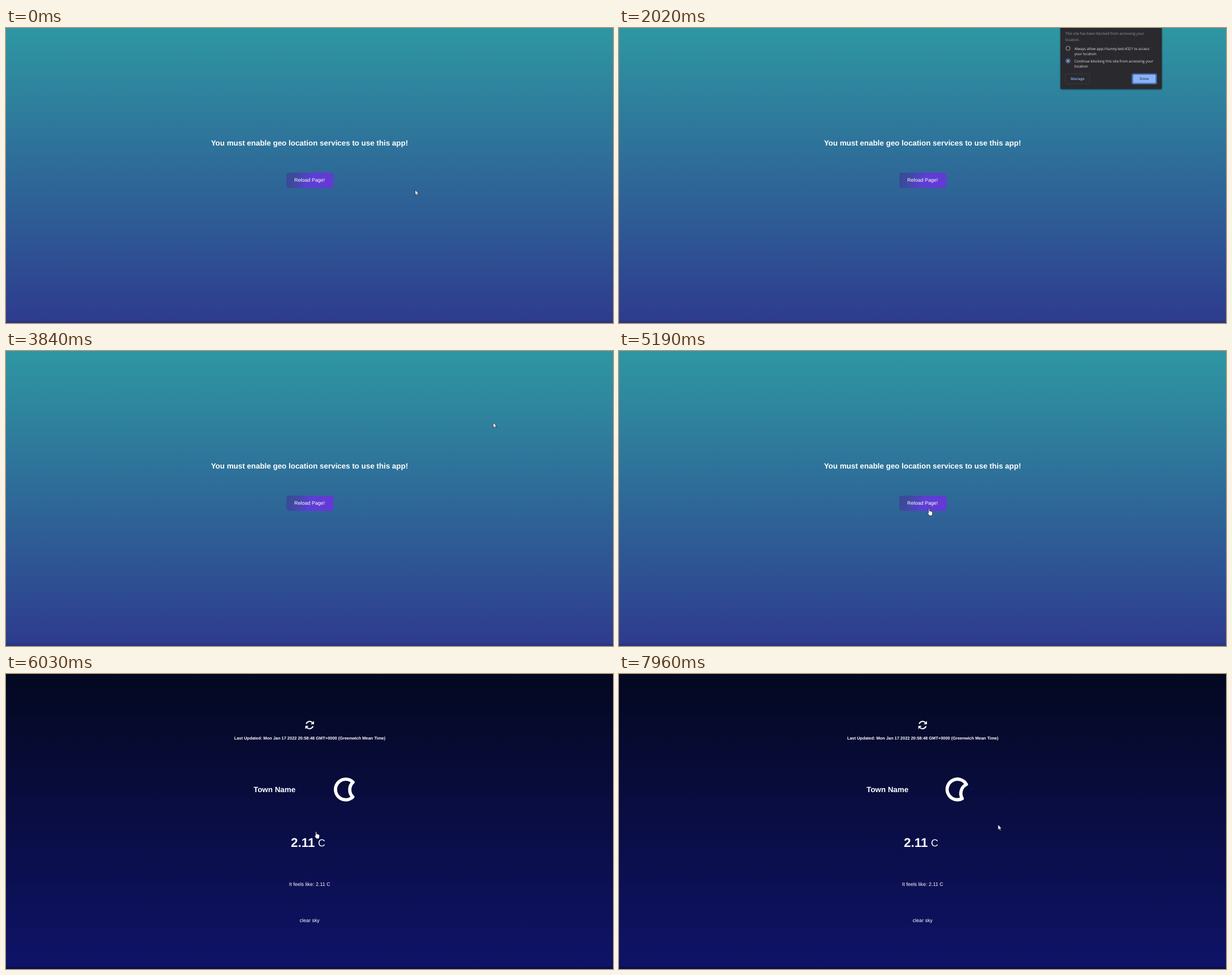
An HTML page that plays this animation: 1074x522 px, repeating every 8 s.

```html
<!DOCTYPE html>
<html lang="en">
<head>
<meta charset="utf-8">
<title>Weather app</title>
<style>
  html, body { margin: 0; width: 100%; height: 100%; overflow: hidden; background: #2e6898; }
  svg { display: block; width: 100vw; height: 100vh; }
  text { font-family: "Liberation Sans", Arial, sans-serif; font-size: 8.95px; fill: #fff; text-rendering: geometricPrecision; }
  .bold { font-weight: bold; }
  .title { font-size: 13.4px; }
  .mid { text-anchor: middle; }
  #popup text { font-family: "Open Sans", "Noto Sans", sans-serif; font-size: 6.4px; fill: #e8eaed; }
  #popup .muted { fill: #969ba1; }
  #popup .label { font-weight: 600; }
  .ring { fill: none; stroke: #c4c7cc; stroke-width: .8; }
  .ring.on { stroke: #8ab4f8; }
  .dot { fill: #8ab4f8; }
</style>
</head>
<body>
<svg viewBox="0 0 1074 522" preserveAspectRatio="none">
  <defs>
    <linearGradient id="daySky" x2="0" y2="1">
      <stop stop-color="#2e97a2"/><stop offset="1" stop-color="#2e3b8e"/>
    </linearGradient>
    <linearGradient id="nightSky" x2="0" y2="1">
      <stop stop-color="#040820"/><stop offset="1" stop-color="#0f1368"/>
    </linearGradient>
    <linearGradient id="buttonFill" y2=".12">
      <stop stop-color="#3a4a94"/><stop offset=".2" stop-color="#3d4a9c"/>
      <stop offset=".55" stop-color="#5b3fd2"/><stop offset="1" stop-color="#6439d4"/>
    </linearGradient>
    <filter id="shadow" x="-10%" y="-10%" width="120%" height="125%">
      <feDropShadow dx="0" dy="1" stdDeviation="1.5" flood-opacity=".45"/>
    </filter>
  </defs>

  <g id="day">
    <rect width="1074" height="522" fill="url(#daySky)"/>
    <rect y="518" width="1074" height="4" opacity=".1"/>
    <text class="bold title mid" x="537" y="208">You must enable geo location services to use this app!</text>
    <rect x="496" y="256" width="83.5" height="27" rx="4.5" fill="url(#buttonFill)"/>
    <text class="mid" x="537.2" y="272.3">Reload Page!</text>
  </g>

  <g id="popup">
    <rect x="781" y="-5" width="179.5" height="113" rx="2" fill="#292a2d" filter="url(#shadow)"/>
    <text class="muted" x="789.7" y="12.3">This site has been blocked from accessing your</text>
    <text class="muted" x="789.7" y="23.3">location.</text>
    <circle id="halo" cx="794.5" cy="36" r="8" fill="#46474a"/>
    <circle class="ring" id="allowRing" cx="794.5" cy="36" r="3.7"/>
    <circle class="dot" id="allowDot" cx="794.5" cy="36" r="2"/>
    <text x="805.7" y="38.5">Always allow app://sunny.test:4321 to access</text>
    <text x="805.7" y="47.7">your location</text>
    <circle class="ring" id="blockRing" cx="794.5" cy="58.2" r="3.7"/>
    <circle class="dot" id="blockDot" cx="794.5" cy="58.2" r="2"/>
    <text x="805.7" y="61">Continue blocking this site from accessing your</text>
    <text x="805.7" y="70.2">location</text>
    <rect x="790" y="81" width="43" height="17.7" rx="2" fill="none" stroke="#3c4043" stroke-width=".8"/>
    <text class="label mid" x="811.4" y="92.3" style="fill:#8ab4f8">Manage</text>
    <rect id="focus" x="908" y="81" width="43" height="17.7" rx="2" fill="#1d2a4a" stroke="#4f8df5" stroke-width="1.2"/>
    <rect x="909.3" y="82.3" width="40.4" height="15.2" rx="1.5" fill="#8ab4f8"/>
    <text class="label mid" x="929.4" y="92.3" style="fill:#34425c">Done</text>
  </g>

  <g id="night">
    <rect width="1074" height="522" fill="url(#nightSky)"/>
    <rect y="518" width="1074" height="4" opacity=".25"/>
    <g fill="#fff">
      <g id="syncHalf">
        <path d="M531.2 88.3A6.3 6.3 0 0 1 542 86" fill="none" stroke="#fff" stroke-width="2.1"/>
        <path d="M544.8 83V88.9H538.9Z"/>
      </g>
      <use href="#syncHalf" transform="rotate(180 537.2 90.3)"/>
    </g>
    <text class="bold mid" x="537.4" y="115.7" style="font-size:7.45px">Last Updated: Mon Jan 17 2022 20:58:48 GMT+0000 (Greenwich Mean Time)</text>
    <text class="bold title" x="438" y="209.2">Town Name</text>
    <path id="moon" d="M613.5 190A18.2 18.2 0 1 0 616 216A18 18 0 0 1 613.5 190Z"
      fill="none" stroke="#fff" stroke-width="5.8" stroke-linejoin="round"/>
    <text class="bold" x="504" y="306.3" style="font-size:22.4px">2.11</text>
    <text x="552" y="305" style="font-size:17.9px">C</text>
    <text class="mid" x="537.2" y="375">It feels like: 2.11 C</text>
    <text class="mid" x="537.2" y="439">clear sky</text>
  </g>

  <circle id="click" r="7" fill="#d2bd1c" opacity=".8"/>
  <g id="cursor" fill="#fff" stroke="#1a1a2a" stroke-width=".7" stroke-linejoin="round">
    <path id="arrow" d="M0 0V9L2 7.2L3.4 10.4L4.9 9.7L3.5 6.7H6.3Z"/>
    <path id="hand" d="M-.9 .9Q-.8 0 0 0T.9 .9V4.2Q2 3.6 2.5 4.6Q3.6 4.1 4.1 5.1Q5.6 4.8 5.9 6.3V9Q5.8 10.6 4.9 11.6V12.6H.2V11.8L-2.6 8.2Q-3 6.8-1.7 6.9L-.9 7.6Z"/>
  </g>
</svg>
<script>
  const LOOP = 8000, NIGHT_START = 5240;
  const $ = id => document.getElementById(id);
  const show = (id, on) => $(id).style.display = on ? "" : "none";
  const within = (t, a, b) => t >= a && t < b;

  // Pointer tip: [time, x, y]
  const path = [
    [0, 724, 286.5], [820, 944, 23], [960, 944, 23], [1080, 944, 23], [1220, 962, 12],
    [2130, 905, -10], [2420, 915, 73], [2760, 861.5, 36.5], [3010, 861.5, 36.5],
    [3420, 928, 93], [3620, 928, 93], [4440, 559, 281], [4570, 513, 267], [4680, 548.7, 279],
    [7220, 548.7, 279], [7660, 637, 276], [7980, 671, 266.5]
  ];
  const clicks = [[2910, 3060], [3480, 3640], [4830, 4980]];

  function pointerAt(t) {
    const next = path.findIndex(p => p[0] > t);
    if (next < 0) return path[path.length - 1].slice(1);
    const [t0, x0, y0] = path[next - 1], [t1, x1, y1] = path[next];
    const u = (t - t0) / (t1 - t0), ease = u * u * (3 - 2 * u);
    return [x0 + (x1 - x0) * ease, y0 + (y1 - y0) * ease];
  }

  function draw(t) {
    const [x, y] = pointerAt(t);
    const night = t >= NIGHT_START, allowed = t >= 3010;
    show("day", !night);
    show("night", night);
    show("popup", within(t, 2020, 3640));
    show("halo", t >= 2910);
    show("focus", !allowed);
    show("allowDot", allowed);
    show("blockDot", !allowed);
    $("allowRing").classList.toggle("on", allowed);
    $("blockRing").classList.toggle("on", !allowed);

    // The moon swings 8 degrees per second about a point above its centre.
    $("moon").setAttribute("transform", `rotate(${(t - NIGHT_START) * .008} 600.3 195.5)`);

    const move = `translate(${x} ${y})`;
    const hand = within(t, 4420, 7240);
    $("cursor").setAttribute("transform", move);
    $("click").setAttribute("transform", move);
    show("cursor", !within(t, 1260, 2160));
    show("arrow", !hand);
    show("hand", hand);
    show("click", clicks.some(([a, b]) => within(t, a, b)));
  }

  const start = performance.now();
  function tick() {
    draw((performance.now() - start) % LOOP);
    requestAnimationFrame(tick);
  }
  tick();
</script>
</body>
</html>
```
